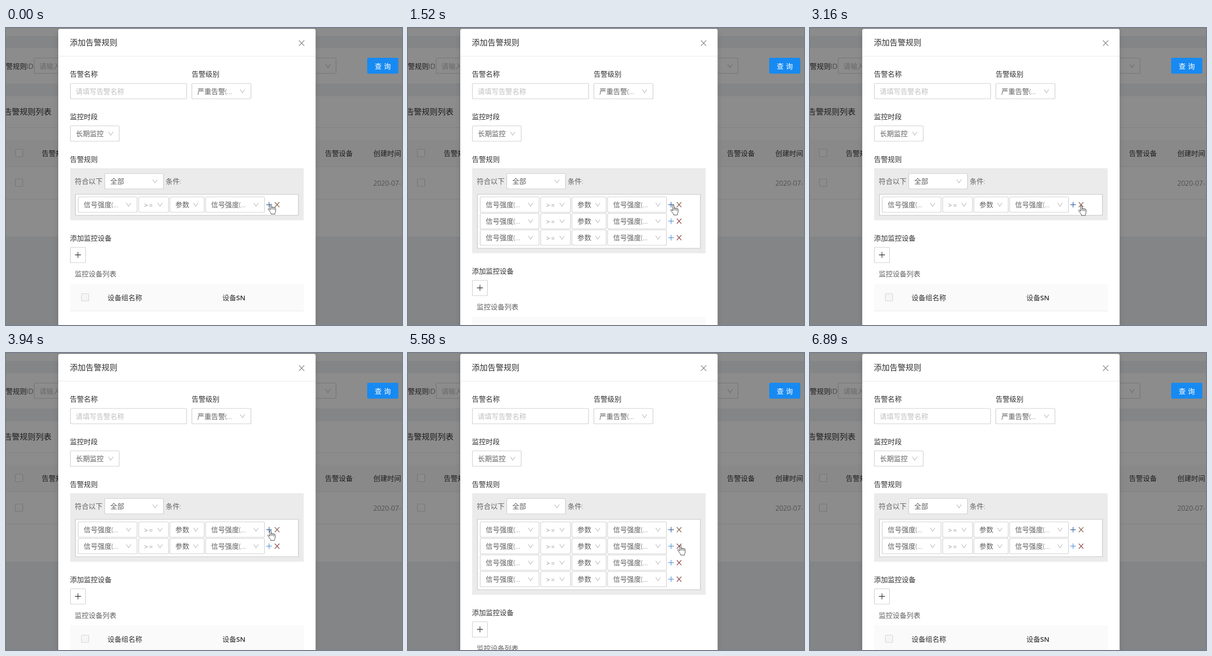
Write an HTML page with a canvas that moves like this. It is 864 px wide and 648 px high and loops after 9310 ms.

```html
<!DOCTYPE html>
<html lang="zh-CN">
<head>
<meta charset="utf-8">
<style>
html, body { margin: 0; width: 100%; height: 100%; overflow: hidden; }
canvas { display: block; }
</style>
</head>
<body>
<canvas id="stage" width="864" height="648"></canvas>
<script>
const g = document.getElementById('stage').getContext('2d');
const LOOP = 9310, HIDE = 6890, ROW = 36;
const DARK = '#303030', MID = '#606060', BORDER = '#cbcbcb';

// [time, number of condition rows]
const ROWS = [[0, 1], [890, 2], [1520, 3], [2760, 2], [3160, 1], [3940, 2],
  [4260, 3], [4640, 4], [5810, 3], [6210, 2]];

// Pointer moves: [first step, last step, steps, x, y, easing power]
const START = [578, 384];
const MOVES = [
  [280, 370, 2, 579, 386, 1],
  [1900, 2140, 4, 601, 395, 1],
  [2220, 2380, 3, 592, 387, 1],
  [3410, 3650, 4, 577, 387, 1],
  [4890, 5120, 4, 596, 437, 1],
  [5270, 5420, 3, 594.5, 420, 1],
  [5580, 5580, 1, 594.5, 419, 1],
  [6440, 6815, 6, 782, 617, 1.6]
];

const HAND = new Path2D('M5 13V1.8a1.5 1.5 0 0 1 3 0V8a1.5 1.5 0 0 1 3 0v.6a1.5 1.5 0 0 1 3 0v.8a1.4 1.4 0 0 1 2.8 0V15c0 3-1.6 4-1.6 7H7c0-2.5-2-4-3.5-6.5L.8 11.8c-.8-1.6 1.2-2.6 2.2-1.4z');
const FINGERS = new Path2D('M8 8v4M11 9v3M14 10v3');
const ARROW = new Path2D('M0 0V17l4-3.8 2.6 6 2.6-1.1L6.6 12.3H12z');

function fill(x, y, w, h, color) {
  g.fillStyle = color;
  g.fillRect(x, y, w, h);
}

function box(x, y, w, h, bg = '#fff', border = BORDER, r = 2) {
  g.beginPath();
  g.roundRect(x, y, w, h, r);
  g.fillStyle = bg;
  g.fill();
  g.strokeStyle = border;
  g.lineWidth = 1.2;
  g.stroke();
}

// y is the middle of the glyphs
function text(s, x, y, color = DARK, size = 15.15, weight = 300) {
  g.font = `${weight} ${size}px "Open Sans", "Noto Sans CJK SC", "Noto Sans CJK", sans-serif`;
  g.fillStyle = color;
  g.fillText(s, x, y + size * .37);
}

function lines(color, width, ...paths) {
  g.strokeStyle = color;
  g.lineWidth = width;
  g.beginPath();
  for (const [x, y, ...rest] of paths) {
    g.moveTo(x, y);
    for (let i = 0; i < rest.length; i += 2) g.lineTo(rest[i], rest[i + 1]);
  }
  g.stroke();
}

const plus = (x, y, r, color, w = 1.4) =>
  lines(color, w, [x - r, y, x + r, y], [x, y - r, x, y + r]);
const cross = (x, y, rx, ry, color, w = 1.4) =>
  lines(color, w, [x - rx, y - ry, x + rx, y + ry], [x + rx, y - ry, x - rx, y + ry]);
const chevron = (x, y, color = '#b5b5b5') =>
  lines(color, 1.2, [x - 5, y - 4, x, y + 3.5, x + 5, y - 4]);

function select(x, y, w, label) {
  box(x, y, w, 33.5);
  if (label) text(label, x + 12, y + 17, MID);
  chevron(x + w - 18.5, y + 17);
}

function page() {
  const panel = '#8c8c8c', rule = '#7f7f7f', ink = '#1c1c1c', edge = '#747474';
  fill(0, 0, 864, 648, '#848587');
  fill(0, 1, 864, 16, panel);
  fill(0, 44, 864, 77, panel);
  fill(0, 149, 864, 306, panel);
  fill(0, 244, 864, 58, '#898989');
  for (const y of [217, 302, 373]) fill(0, y, 864, 1, rule);

  text('告警规则ID', -15.5, 83, ink);
  box(61.5, 65.5, 200, 33.5, panel, edge);
  text('请输入', 73, 83, '#696969');
  box(600.5, 65.5, 119.5, 33.5, panel, edge);
  chevron(702.5, 83, '#666');
  g.beginPath();
  g.roundRect(788, 65, 68, 34.5, 3);
  g.fillStyle = '#178af2';
  g.fill();
  text('查', 804.5, 83, '#fff');
  text('询', 824.5, 83, '#fff');

  text('告警规则列表', -4.5, 183, ink, 17.3);
  for (const y of [264.5, 329.5]) box(20.5, y, 16, 16, panel, edge);
  text('告警规则', 78, 273, ink);
  text('告警设备', 696, 273, ink);
  text('创建时间', 801.5, 273, ink);
  text('2020-07-13', 801.5, 338, '#313131', 14.9);
}

function modal(n) {
  const d = ROW * (n - 1);
  g.save();
  g.shadowColor = 'rgba(0,0,0,.15)';
  g.shadowBlur = 12;
  g.shadowOffsetY = 4;
  g.beginPath();
  g.roundRect(114, 2, 561.5, 700, 4);
  g.fillStyle = '#fff';
  g.fill();
  g.restore();

  text('添加告警规则', 139.3, 32, DARK, 17.3);
  cross(645, 33, 5.8, 6, '#858585', 1.3);
  fill(114, 61, 561, 1, '#e8e8e8');

  text('告警名称', 139.5, 100);
  box(140.5, 121, 253.5, 33.5);
  text('请填写告警名称', 152, 138, '#bfbfbf');
  text('告警级别', 405, 100);
  select(405.5, 121, 129, '严重告警(…');
  text('监控时段', 139.5, 193);
  select(140.5, 213.5, 106.5, '长期监控');
  text('告警规则', 139.5, 286);

  fill(140, 306, 509.5, 113.5 + d, '#ebebeb');
  text('符合以下', 150, 334, MID);
  select(215.5, 317.5, 128, '全部');
  text('条件:', 348.5, 334, MID);
  box(151.5, 363, 486.5, 45.5 + d, '#fff', '#c2c2c2', 0);
  for (let i = 0; i < n; i++) row(i);

  text('添加监控设备', 139.5, 458 + d);
  box(140.5, 478.5 + d, 33, 33.5);
  plus(157, 495 + d, 6.5, '#333', 1.3);
  text('监控设备列表', 150, 536 + d, MID);
  fill(140, 558 + d, 509.5, 59, '#fafafa');
  fill(140, 617 + d, 509.5, 1, '#e6e6e6');
  box(164.5, 579.5 + d, 16, 16, '#f5f5f5', '#d3d3d3');
  text('设备组名称', 221.5, 588 + d);
  text('设备', 472, 588 + d);
  text('SN', 502.3, 588 + d, DARK, 15.15, 600);
}

function row(i) {
  const y = 368.5 + ROW * i, mid = y + 17;
  select(157.5, y, 128.5, '信号强度(…');
  select(289.5, y, 65, '');
  text('>', 301.5, mid + 1, MID, 14);
  text('=', 312.3, mid + 1, MID, 14);
  select(357.5, y, 75, '参数');
  select(435.5, y, 128.5, '信号强度(…');
  plus(574, mid, 6, i ? '#5b9bd8' : '#3a68a4');
  cross(591.5, mid, 5, 5.5, i ? '#8f4646' : '#86604a');
}

function pointerAt(t) {
  let [x, y] = START;
  for (const [from, to, steps, tx, ty, pow] of MOVES) {
    if (t < from) break;
    const gap = (to - from) / (steps - 1) || 1;
    const step = Math.min(steps, Math.floor((t - from) / gap + .001) + 1);
    const k = (step / steps) ** pow;
    x += (tx - x) * k;
    y += (ty - y) * k;
  }
  return [x, y];
}

function pointer(t, n) {
  const [x, y] = pointerAt(t);
  const line = Math.round((y - 385.5) / ROW);
  const onIcon = line >= 0 && line < n && Math.abs(y - 385.5 - ROW * line) < 8 &&
    (Math.abs(x - 574) < 8 || Math.abs(x - 591.5) < 7.5);
  g.save();
  g.translate(onIcon ? x - 6.5 : x, y);
  g.fillStyle = '#fff';
  g.strokeStyle = '#333';
  g.lineWidth = 1;
  g.fill(onIcon ? HAND : ARROW);
  g.stroke(onIcon ? HAND : ARROW);
  if (onIcon) g.stroke(FINGERS);
  g.restore();
}

function draw(now) {
  const t = now % LOOP;
  const n = ROWS.findLast(([start]) => start <= t)[1];
  page();
  modal(n);
  if (t < HIDE) pointer(t, n);
}

const t0 = performance.now();
function tick() {
  draw(performance.now() - t0);
  requestAnimationFrame(tick);
}
tick();
</script>
</body>
</html>
```
